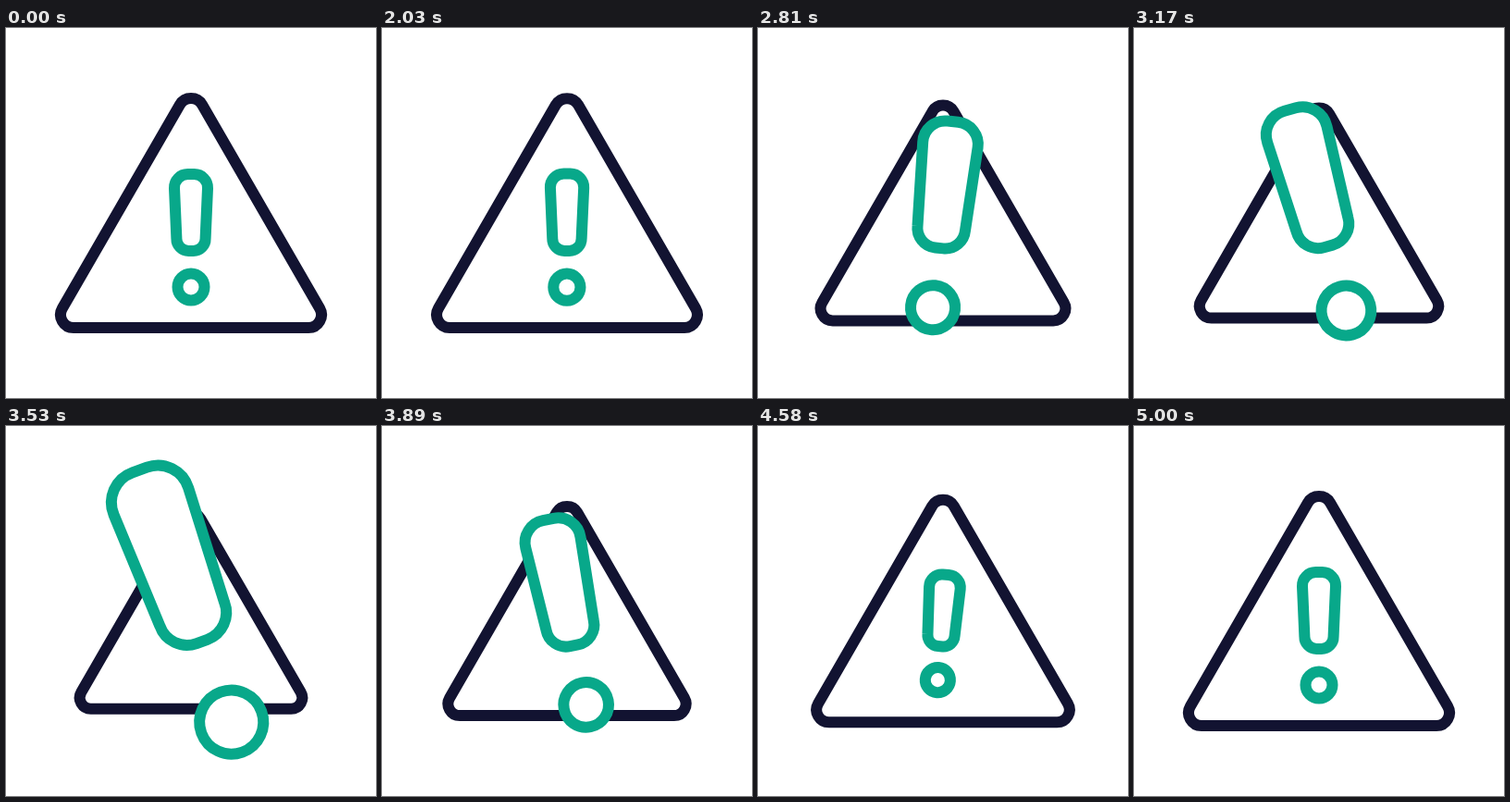
Write an HTML page that moves like this. It is 400 px wide and 400 px high and loops after 5030 ms.

```html
<!DOCTYPE html>
<html lang="en">
<head>
<meta charset="utf-8">
<title>Warning</title>
<style>
  html, body { margin: 0; height: 100%; overflow: hidden; background: #fff; }
  svg { display: block; width: 100%; height: 100%; }
  svg * { fill: #fff; stroke-width: 12; vector-effect: non-scaling-stroke; }
  #triangle { stroke: #121331; }
  #mark { stroke: #08a88a; }
</style>
</head>
<body>
<!-- Both shapes are drawn around the middle of the stage -->
<svg viewBox="-200 -200 400 400">
  <path id="triangle" d="M-12.1 -117A14 14 0 0 1 12.1 -117L139.1 103A14 14 0 0 1 127 124H-127A14 14 0 0 1 -139.1 103Z"/>
  <g id="mark">
    <path d="M-3.5 -68.2H3.5A14.5 14.5 0 0 1 18 -53L15.6 1.5A13 13 0 0 1 2.6 14.7H-2.6A13 13 0 0 1 -15.6 1.5L-18 -53A14.5 14.5 0 0 1 -3.5 -68.2Z"/>
    <circle cy="53.7" r="14.5"/>
  </g>
</svg>
<script>
const LOOP = 5030, START = 2030, STEP = 30, REST_Y = 26.25;

const triangle = document.getElementById('triangle');
const mark = document.getElementById('mark');

// Smooth move from 0 to 1 between two times
function ramp(t, from, to) {
  const x = Math.min(1, Math.max(0, (t - from) / (to - from)));
  return x * x * x * (10 - 15 * x + 6 * x * x);
}

function draw(now) {
  const time = now % LOOP;
  const t = time < START ? 0 : START + Math.floor((time - START) / STEP) * STEP;

  // Two beats: the mark swells while the triangle shrinks, with a dip between
  const swell = ramp(t, 2000, 2370);
  const dip = ramp(t, 2370, 2935) - ramp(t, 2935, 3518);

  const frame = 1 - .147 * swell + .093 * dip
    + .275 * ramp(t, 3730, 4205) - .158 * ramp(t, 4205, 4560) + .03 * ramp(t, 4560, 5000);
  const size = 1 + 1.38 * swell - .78 * dip
    - 1.48 * ramp(t, 3530, 4270) + .1 * ramp(t, 4270, 5000);
  const angle = 19 * swell - 39 * ramp(t, 2370, 3450)
    + 25 * ramp(t, 3518, 4420) - 5 * ramp(t, 4420, 5000);

  // The larger the mark, the closer it sits to the middle
  const y = REST_Y * Math.min(1, size) - 19 * Math.max(0, size - 1);

  triangle.setAttribute('transform', `scale(${frame})`);
  mark.setAttribute('transform', `rotate(${angle}) translate(0 ${y}) scale(${size})`);
}

const origin = performance.now();
function loop() {
  draw(performance.now() - origin);
  requestAnimationFrame(loop);
}
loop();
</script>
</body>
</html>
```
